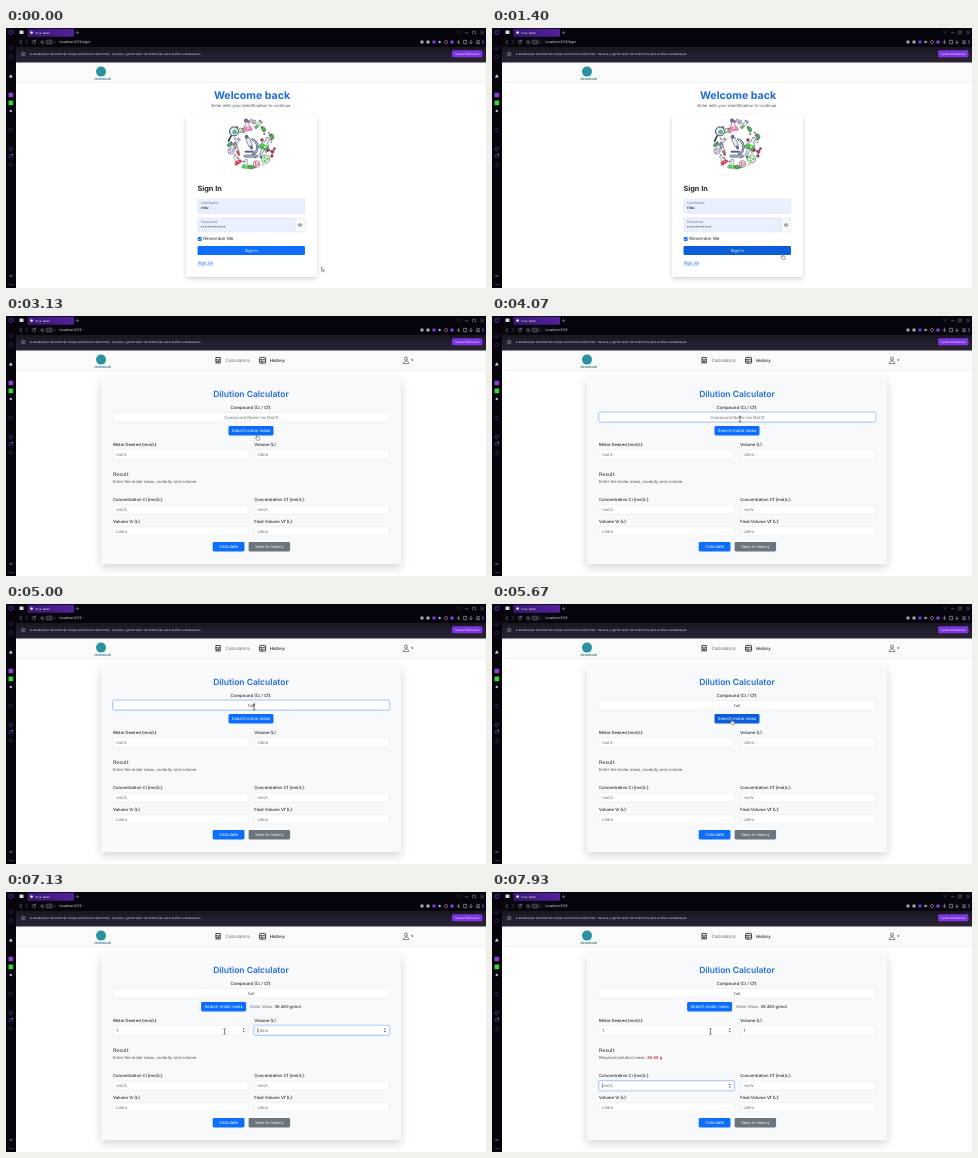
An HTML page for the animation above (8000 ms loop, 480 by 260 pixels).

```html
<!DOCTYPE html>
<html lang="en">
<head>
<meta charset="utf-8">
<title>Dilution Calculator</title>
<style>
  html, body { margin: 0; width: 100%; height: 100%; overflow: hidden; background: #fff; }
  svg { display: block; width: 100vw; height: 100vh; }
  text { font-family: Inter, "Open Sans", sans-serif; text-rendering: geometricPrecision; white-space: pre; }
</style>
</head>
<body>
<svg id="stage" viewBox="0 0 480 260" xmlns="http://www.w3.org/2000/svg"></svg>
<script>
const LOOP = 8000;
const BLUE = '#0d6efd', TITLE = '#1f6bdc', INK = '#212529', MUTED = '#6c757d';

// Markup helpers
const attrs = o => Object.entries(o).map(([k, v]) => ` ${k}="${v}"`).join('');
const rect = (x, y, w, h, fill, more = {}) => `<rect${attrs({ x, y, width: w, height: h, fill, ...more })}/>`;
const circle = (cx, cy, r, fill, more = {}) => `<circle${attrs({ cx, cy, r, fill, ...more })}/>`;
const path = (d, fill, more = {}) => `<path${attrs({ d, fill, ...more })}/>`;
const line = (d, stroke, w = 0.6, more = {}) =>
  path(d, 'none', { stroke, 'stroke-width': w, 'stroke-linecap': 'round', 'stroke-linejoin': 'round', ...more });
const text = (x, y, s, size, fill = INK, more = {}) =>
  `<text${attrs({ x, y, 'font-size': size, fill, ...more })}>${s}</text>`;
const mid = { 'text-anchor': 'middle' };
const medium = { 'font-weight': 500 }, semi = { 'font-weight': 600 }, bold = { 'font-weight': 700 };
const group = (id, body, more = {}) => `<g${attrs({ id, ...more })}>${body}</g>`;
const turned = (x, y, a, body) => `<g transform="translate(${x} ${y}) rotate(${a})">${body}</g>`;

const button = (id, x, y, w, h, label, size, fill = BLUE) => group(id,
  rect(x, y, w, h, fill, { rx: 1.4 }) + text(x + w / 2, y + h / 2 + 1.45, label, size, '#fff', mid));

function browser() {
  const grey = '#a9a5b5';
  let s = rect(0, 0, 480, 19, '#07050c') + rect(0, 19, 480, 15.5, 'url(#notice)') + rect(0, 0, 10, 260, '#07050b');
  // Tabs
  s += rect(13.5, 2.6, 4, 3.4, '#d8d5e2', { rx: 0.5 }) + rect(21.5, 0.8, 46.5, 8, 'url(#tab)', { rx: 1.2 });
  s += circle(25.6, 4.6, 1.4, '#e4e1ee') + text(29, 5.8, 'Orva-Selmi', 2.8, '#e9e5f5');
  s += line('M70 4.6h3M71.5 3.1v3', '#8f8a9c', 0.5);
  s += line('M452 3.6l1 1 1-1M459.5 4.8h2.6M467 3.3h2.5v2.5h-2.5zM474.8 3.2l2.6 2.6m0-2.6l-2.6 2.6', '#a9a4b8', 0.45);
  // Address row
  s += line('M15.4 12.4l-1.6 1.7 1.6 1.7', grey, 0.6) + line('M20 12.4l1.6 1.7-1.6 1.7', '#5b5668', 0.6);
  s += line('M29.4 13a1.7 1.7 0 1 0 .2 1.7M29.6 12v1.2h-1.2', grey, 0.5);
  s += circle(36, 14, 1.3, 'none', { stroke: grey, 'stroke-width': 0.5 }) + line('M37 15l.9.9', grey, 0.5);
  s += rect(40.2, 12.2, 5.8, 3.7, 'none', { stroke: grey, 'stroke-width': 0.5, rx: 0.7 });
  s += text(43.1, 15, 'VPN', 2, grey, mid);
  s += line('M49 13.1l-.9 1 .9 1', grey, 0.4);
  s += `<text id="url" x="53.6" y="15.2" font-size="3.25" fill="#f3f1f8"></text>`;
  ['#a9a5b5', '#b9a6b6', '#7a3fe0', '#b7b3c2', '#c08ab8', '#8b3ff0'].forEach((c, i) => {
    const x = 416 + 6 * i;
    s += i === 4 ? circle(x, 14, 1.6, 'none', { stroke: c, 'stroke-width': 0.6 })
      : i === 3 ? path(`M${x - 1.4} 12.4l3.2 1.6-3.2 1.6z`, c)
      : rect(x - 1.5, 12.6, 3, 2.8, c, { rx: 0.5 });
  });
  s += line('M452.5 12.2v3m-1.4-1.3l1.4 1.4 1.4-1.4M458 12.4h2.6v3.3h-2.6zM465 12.2v3.4m-1.5-1.4l1.5 1.5 1.5-1.5M470.6 12.8h3M470.6 14.2h3M470.6 15.6h3', '#cfcbd9', 0.5);
  s += rect(476.4, 12.2, 1.2, 3.6, '#7a3fe0');
  // Notice bar
  s += circle(17.2, 26, 1.9, 'none', { stroke: '#bbb6c9', 'stroke-width': 0.5 }) + line('M17.2 25.8v1.1M17.2 25v.01', '#bbb6c9', 0.5);
  s += text(23.8, 27.1, 'A atualização da extensão requer permissões adicionais. Vá para o gerenciador de extensões para aceitar a atualização.', 3.03, '#dcd9e5');
  s += rect(446, 22.3, 30.4, 7, '#7d35e2', { rx: 1.2 }) + text(461.2, 26.9, 'Ir para Extensões', 3, '#f1e9ff', mid);
  // Sidebar
  s += circle(5, 4.4, 2, 'none', { stroke: '#6423b5', 'stroke-width': 1 });
  [20, 29, 102, 137].forEach(y => s += rect(3.4, y - 1.4, 3, 2.8, 'none', { stroke: '#4d2b84', 'stroke-width': 0.6, rx: 0.7 }));
  s += path('M4.8 46.2l1.9 3.4h-3.8z', '#d9d9df');
  s += rect(2.5, 64.8, 4.7, 4.5, '#8940d8', { rx: 0.7 }) + rect(2.5, 72.6, 4.7, 4.7, '#35d23f', { rx: 0.7 });
  s += circle(4.8, 83, 1.2, '#b8b5c2');
  s += circle(4.8, 121, 1.6, 'none', { stroke: '#5a379f', 'stroke-width': 0.7 });
  s += circle(4.8, 128, 1.7, 'none', { stroke: '#4c41b8', 'stroke-width': 0.7 }) + circle(6.4, 126.8, 0.7, '#7f7cff');
  s += rect(3.2, 246.8, 3.4, 2, '#4b3a6f', { rx: 0.5 });
  [3.3, 4.8, 6.3].forEach(x => s += circle(x, 256.5, 0.45, '#918c9e'));
  return s;
}

function header() {
  return rect(10, 34, 470, 20, '#fafafa') + rect(10, 54, 470, 0.4, '#dddfe2')
    + circle(95, 43.6, 5, '#2b93a0') + text(96.5, 51.6, 'ORVASELMI', 2.9, '#286c83', { ...mid, ...semi });
}

function illustration() {
  const ink = '#2c3340', o = { stroke: ink, 'stroke-width': 0.45, 'stroke-linejoin': 'round' };
  const green = '#4fc94a', red = '#e0364f', pink = '#ee7fb2', violet = '#8a62cf', aqua = '#8fd3e8';
  const flask = (x, y, a, size, c) => turned(x, y, a, `<g transform="scale(${size})">`
    + path('M-1.3-5h2.6v4l3.6 5.4c.5 1-.1 1.8-1 1.8h-7.8c-.9 0-1.5-.8-1-1.8l3.6-5.4z', '#f5fbfb', o)
    + path('M-2.7 1.6h5.4l1.9 2.9c.4.7 0 1.4-.7 1.4h-7.8c-.7 0-1.1-.7-.7-1.4z', c) + circle(0.6, 3.4, 0.8, '#fff') + '</g>');
  const tube = (x, y, a, c) => turned(x, y, a, rect(-1.2, -4.5, 2.4, 9, '#f4fbfd', { ...o, rx: 1.2 })
    + rect(-0.9, -0.4, 1.8, 4.6, c, { rx: 0.9 }) + rect(-1.6, -5, 3.2, 0.9, '#fff', o));
  const dish = (x, y, r, fill, spot) => circle(x, y, r, fill, o)
    + [0, 2, 4].map(a => circle(x + r * 0.45 * Math.cos(a), y + r * 0.45 * Math.sin(a), r * 0.25, spot)).join('');
  const leaf = (x, y, a) => turned(x, y, a, path('M-3 0c1.5-2.4 4.5-2.4 6 0-1.5 2.4-4.5 2.4-6 0z', green, o) + line('M-2.6 0h4.4', ink, 0.3));
  let s = '';
  // Loose crumbs between the larger objects
  let seed = 7;
  const random = () => (seed = seed * 16807 % 2147483647) / 2147483647;
  for (let i = 0; i < 46; i++) {
    const a = i * 2.4, r = 12.5 + 12.5 * random();
    s += circle(245 + r * Math.cos(a), 116 + r * Math.sin(a), 0.5 + 0.6 * random(), [green, red, violet, ink, aqua, pink][i % 6], { stroke: ink, 'stroke-width': 0.25 });
  }
  // Ring of objects
  s += flask(241, 97, -8, 0.95, pink) + circle(240, 92.5, 1.7, violet, o) + circle(243.2, 93.6, 1.2, pink, o);
  s += tube(252, 97, 38, green) + leaf(257.5, 101, 50) + dish(248, 94, 2, '#f9d7e4', violet);
  s += line('M225.2 107.8l-2.8 5.4', ink, 1.5) + circle(228, 103.4, 4.5, '#d6eef4', { ...o, 'stroke-width': 0.9 }) + circle(228.6, 104, 1.8, '#69c48a', o);
  s += dish(234.5, 102.5, 2.2, '#dff3d3', green) + leaf(224, 116.5, -35) + tube(230, 114.5, 40, violet);
  s += dish(225, 123, 3.2, '#f4ecf7', violet) + tube(231.5, 123, -20, red);
  s += flask(230.5, 131.5, -32, 0.8, red) + flask(240, 135.5, 6, 0.8, green);
  s += flask(260, 115, 24, 1.15, green) + circle(256, 112, 1.4, red, o) + leaf(266, 108.5, 70);
  s += line('M262 122l4.5 1.6-.6 4.4M266.5 123.6l2-3', ink, 0.6);
  [[262, 122, 1.3], [266.5, 123.6, 1.6], [265.9, 128, 1.3], [268.5, 120.6, 1.1]].forEach(([x, y, r]) => s += circle(x, y, r, red, o));
  s += dish(259.5, 131, 4.2, '#d5f2cd', green) + dish(250.5, 136, 3.4, '#f9dfe5', red) + tube(255.5, 124.5, 24, aqua) + leaf(245.5, 139, 15);
  // Microscope
  s += line('M246.5 111.5a8.4 8.4 0 0 1 .4 15', ink, 2.3) + line('M246.5 111.5a8.4 8.4 0 0 1 .4 15', '#a7b3da', 1.4);
  s += turned(243.4, 115, -24, rect(-1.9, -5.5, 3.8, 9, '#e6e9f6', { ...o, rx: 0.7 }) + rect(-1.3, -8.2, 2.6, 2.7, '#6275b5', o) + rect(-1, 3.5, 2, 3, '#6275b5', o));
  s += rect(239, 123, 8.4, 1.3, '#6275b5', o) + rect(238, 127, 13.6, 2.3, '#a7b3da', { ...o, rx: 0.9 });
  return s;
}

function loginPage() {
  const field = { stroke: '#d5dde9', 'stroke-width': 0.4, rx: 1.4 };
  let s = text(246, 70.7, 'Welcome back', 10.6, TITLE, { ...mid, ...bold });
  s += text(245, 79, 'Enter with your identification to continue', 4.15, '#4a4f55', mid);
  s += rect(180, 87, 131, 162, '#fff', { rx: 2, filter: 'url(#tight)' }) + illustration();
  s += text(191.5, 162.9, 'Sign In', 7.3, INK, bold);
  s += rect(191.7, 171, 107.3, 14.4, '#e8f0fe', field) + text(195, 175.9, 'UserName', 3.5, '#717984') + text(195, 181.4, 'rinu', 4.1, '#10151c', medium);
  s += rect(191.7, 189.8, 97.4, 14.2, '#e8f0fe', field) + text(195, 194.6, 'Password', 3.5, '#717984');
  for (let i = 0; i < 14; i++) s += circle(195.7 + i * 1.76, 198.7, 0.5, '#10151c');
  s += rect(289.1, 189.8, 9.9, 14.2, '#f8f9fa', field);
  s += path('M291.9 197c1.3-1.9 3.2-1.9 4.4 0-1.2 1.9-3.1 1.9-4.4 0z', 'none', { stroke: '#444', 'stroke-width': 0.5 }) + circle(294.1, 197, 0.7, '#444');
  s += rect(191.8, 209.1, 3.9, 3.9, BLUE, { rx: 0.8 }) + line('M192.7 211.1l.8.8 1.5-1.6', '#fff', 0.6);
  s += text(197.2, 212.4, 'Remember Me', 4.4);
  s += button('signIn', 191.5, 218, 107.5, 9.1, 'Sign In', 4.1);
  s += text(191.7, 235.8, 'Sign Up', 4.1, BLUE, { 'text-decoration': 'underline' });
  return s;
}

// Text fields of the calculator: x, y, width, placeholder
const fields = {
  compound: [107, 96.4, 276.5, 'Compound Name (ex NaCl)'],
  molar: [107, 133.6, 135.2, 'mol/L'],
  volume: [248.2, 133.6, 135.2, 'Liters'],
  ci: [107, 189, 135.2, 'mol/L'],
  cf: [248.2, 189, 135.2, 'mol/L'],
  vi: [107, 210.4, 135.2, 'Liters'],
  vf: [248.2, 210.4, 135.2, 'Liters'],
};
const FIELD_H = 9.4;

function input(id) {
  const [x, y, w] = fields[id], centred = id === 'compound';
  return group(id,
    rect(x - 0.5, y - 0.5, w + 1, FIELD_H + 1, 'none', { class: 'ring', rx: 1.8, stroke: BLUE, 'stroke-opacity': 0.27, 'stroke-width': 1 })
    + rect(x, y, w, FIELD_H, '#fff', { class: 'box', rx: 1.4, 'stroke-width': 0.4 })
    + text(centred ? x + w / 2 : x + 3.2, y + 6.1, '', 4.2, INK, { class: 'value', 'text-anchor': centred ? 'middle' : 'start' })
    + line(`M0 ${y + 2.3}v4.8`, INK, 0.4, { class: 'caret' })
    + path(`M${x + w - 5.6} ${y + 4}l1.1-1.5 1.1 1.5zm0 1.5l1.1 1.5 1.1-1.5z`, '#555', { class: 'spin' }));
}

function calculatorPage() {
  let s = '';
  // Navigation
  s += rect(209.4, 41, 5.4, 6.6, '#444a50', { rx: 0.8 }) + rect(210.4, 42, 3.4, 1.3, '#fafafa');
  for (let i = 0; i < 6; i++) s += rect(210.4 + (i % 3) * 1.3, 44.2 + (i > 2) * 1.5, 0.8, 0.8, '#fafafa');
  s += text(219.6, 45.9, 'Calculators', 4.5, '#63686e');
  s += rect(253.6, 41.4, 6, 5.8, 'none', { stroke: '#17191c', 'stroke-width': 0.8, rx: 0.8 }) + line('M253.6 43.4h6M256 43.4v3.8M253.6 45.3h6', '#17191c', 0.6);
  s += text(264, 45.9, 'History', 4.3, '#17191c', medium);
  s += circle(400, 42.6, 1.5, 'none', { stroke: '#333', 'stroke-width': 0.6 }) + line('M397.2 47.2c.2-3.3 5.4-3.3 5.6 0z', '#333', 0.6) + path('M405 43.6h2.4l-1.2 1.4z', '#333');
  // Card
  s += rect(95, 61, 300, 187, '#f8f9fa', { rx: 2.4, filter: 'url(#wide)' });
  s += text(245, 80.7, 'Dilution Calculator', 8.5, TITLE, { ...mid, ...semi });
  s += text(245, 92.7, 'Compound (Ci / Cf):', 4.3, INK, { ...mid, ...medium });
  [[107, 129.6, 'Molar Desired (mol/L):'], [248.2, 129.6, 'Volume (L):'],
   [107, 185.4, 'Concentration Ci [mol/L]:'], [248.2, 185.4, 'Concentration Cf [mol/L]:'],
   [107, 206.7, 'Volume Vi (L):'], [248.2, 206.7, 'Final Volume Vf (L):']]
    .forEach(([x, y, label]) => s += text(x, y, label, 4.2, INK, medium));
  s += text(107, 159.7, 'Result:', 5.1, '#454b51', medium);
  s += text(107, 167.3, '', 4.15, '#50565c', { id: 'result' });
  s += Object.keys(fields).map(input).join('');
  s += button('search', 222.5, 110, 45, 9.4, 'Search molar mass', 4.25);
  s += group('mass', text(244, 116, `Molar Mass: <tspan fill="${INK}" font-weight="500">36.460 g/mol</tspan>`, 4.05, MUTED));
  s += button('calc', 206.7, 226, 31.8, 9.4, 'Calculate', 4.3) + button('save', 242.6, 226, 41.5, 9.4, 'Save to history', 4, MUTED);
  return s;
}

const pointer = { fill: '#fff', stroke: '#222', 'stroke-width': 0.4, 'stroke-linejoin': 'round' };
const cursors =
  group('arrow', path('M0 0v4.2l1-.8.7 1.5.7-.3-.7-1.4h1.3z', '#fff', pointer))
  + group('hand', path('M-.5 .3c0-.6.9-.6.9 0v1.7l1.7.4c.5.1.7.4.6.9l-.3 2h-2.6l-1.5-1.9c-.3-.5.3-.9.7-.5l.5.4z', '#fff', pointer))
  + group('beam', line('M-1-2.8c.6 0 1 .2 1 .6 0-.4.4-.6 1-.6M0-2.2v4.4M-1 2.8c.6 0 1-.2 1-.6 0 .4.4.6 1 .6', '#222', 0.5));

const shadow = (id, dy, blur, opacity) =>
  `<filter id="${id}" x="-20%" y="-20%" width="140%" height="140%"><feDropShadow dx="0" dy="${dy}" stdDeviation="${blur}" flood-opacity="${opacity}"/></filter>`;

document.getElementById('stage').innerHTML = `<defs>
  ${shadow('tight', 1.8, 2, 0.18)}${shadow('wide', 3.5, 5, 0.17)}
  <linearGradient id="tab"><stop stop-color="#3a1872"/><stop offset="1" stop-color="#52209c"/></linearGradient>
  <linearGradient id="notice" x2="0" y2="1"><stop stop-color="#1a1523"/><stop offset="1" stop-color="#2a2436"/></linearGradient>
</defs>` + rect(0, 0, 480, 260, '#fff') + header() + group('login', loginPage()) + group('calculator', calculatorPage())
  + browser() + group('cursor', cursors);

const el = id => document.getElementById(id);
const show = (node, on) => node.setAttribute('display', on ? 'inline' : 'none');
const setText = (node, s) => { if (node.textContent !== s) node.textContent = s; };

// Timeline
const PAGE_AT = 2530, MASS_AT = 5870, RESULT_AT = 7400;
const track = [
  [1000, 315.5, 239], [1230, 292, 225], [1400, 290.6, 226], [1700, 286, 231.6], [2080, 286, 231.6], [2200, 275.4, 223],
  [2680, 275.4, 223], [3130, 251, 118.9], [3200, 250.5, 112.5], [3400, 248, 103],
  [5040, 248, 103], [5330, 239.8, 115.2], [6300, 239.8, 115.2], [6600, 218.5, 139.5],
];
const focusSpans = [['compound', 3500, 5470], ['molar', 6730, 7130], ['volume', 7130, 7600], ['ci', 7600, LOOP]];
const typing = { compound: [[4270, 'h'], [4530, 'hc'], [4730, 'hcl']], molar: [[6930, '1']], volume: [[7330, '1']] };

function cursorAt(t) {
  const i = track.findIndex(k => k[0] > t);
  if (i === 0) return track[0].slice(1);
  if (i < 0) return track[track.length - 1].slice(1);
  const [t0, x0, y0] = track[i - 1], [t1, x1, y1] = track[i];
  const u = (t - t0) / (t1 - t0), e = u * u * (3 - 2 * u);
  return [x0 + (x1 - x0) * e, y0 + (y1 - y0) * e];
}

const inside = ([px, py], x, y, w, h) => px >= x && px <= x + w && py >= y && py <= y + h;
const overSignIn = t => t < PAGE_AT && inside(cursorAt(t), 191.5, 218, 107.5, 9.1);
const searchX = t => t < MASS_AT ? 222.5 : 195.1;
const overSearch = t => t >= PAGE_AT && inside(cursorAt(t), searchX(t), 110, 45, 9.4);

// Share of the last 150 ms spent over a button, giving its colour fade
function hover(over, t) {
  let n = 0;
  for (let i = 0; i < 10; i++) n += over(t - i * 15);
  return n / 10;
}
const shade = k => `rgb(${[[13, 11], [110, 94], [253, 215]].map(([a, b]) => Math.round(a + (b - a) * k))})`;

function updateField(id, t, mouse) {
  const node = el(id), part = c => node.querySelector('.' + c);
  const [x, y, w, hint] = fields[id];
  const span = focusSpans.find(([f, a, b]) => f === id && t >= a && t < b);
  const typed = (typing[id] || []).filter(k => t >= k[0]).pop();
  const over = inside(mouse, x, y, w, FIELD_H);
  const value = part('value');
  setText(value, typed ? typed[1] : hint);
  value.setAttribute('fill', typed ? INK : '#646a71');
  show(part('ring'), span);
  part('box').setAttribute('stroke', span ? '#86b7fe' : '#dee2e6');
  show(part('spin'), id !== 'compound' && (span || over));
  const since = span && t - Math.max(span[1], typed ? typed[0] : 0);
  show(part('caret'), span && since % 1060 < 530);
  if (span) {
    const width = typed ? value.getComputedTextLength() : 0;
    const start = id === 'compound' ? x + w / 2 - width / 2 : x + 3.2;
    part('caret').setAttribute('transform', `translate(${start + width + 0.2} 0)`);
  }
  return over;
}

function render(t) {
  const onLogin = t < PAGE_AT, mouse = cursorAt(t);
  show(el('login'), onLogin);
  show(el('calculator'), !onLogin);
  setText(el('url'), onLogin ? 'localhost:5173/login' : 'localhost:5173');

  let overField = false;
  if (!onLogin) for (const id in fields) overField = updateField(id, t, mouse) || overField;

  el('signIn').firstChild.setAttribute('fill', shade(hover(overSignIn, t)));
  el('search').firstChild.setAttribute('fill', shade(hover(overSearch, t)));
  el('search').setAttribute('transform', `translate(${searchX(t) - 222.5} 0)`);
  show(el('mass'), t >= MASS_AT);
  const result = t < RESULT_AT ? 'Enter the molar mass, molarity and volume.'
    : 'Required solution mass: <tspan fill="#c9303e" font-weight="600">36.46 g</tspan>';
  if (el('result').innerHTML !== result) el('result').innerHTML = result;

  const kind = overField ? 'beam' : overSignIn(t) || overSearch(t) ? 'hand' : 'arrow';
  ['arrow', 'hand', 'beam'].forEach(k => show(el(k), k === kind));
  el('cursor').setAttribute('transform', `translate(${mouse})`);
}

const start = performance.now();
function frame() {
  render((performance.now() - start) % LOOP);
  requestAnimationFrame(frame);
}
frame();
</script>
</body>
</html>
```
